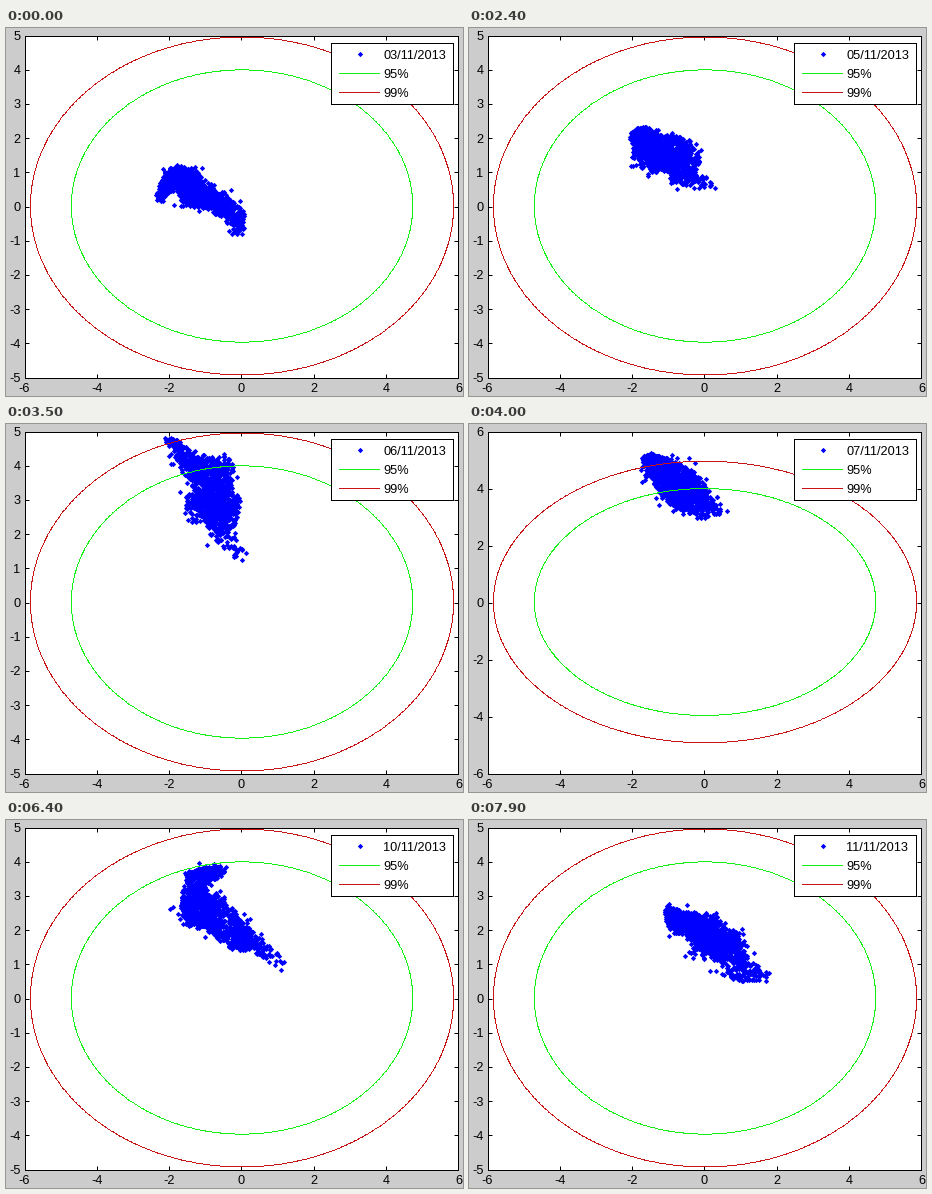
A matplotlib script for the animation above (8000 ms loop, 457 px wide and 368 px high).

```python
import numpy as np
import matplotlib.pyplot as plt
from matplotlib.animation import FuncAnimation
from matplotlib.patches import Rectangle

W, H, DPI = 457, 368, 64
PX = 72 / DPI  # points per pixel
BLUE, GREEN, RED = "#0000ff", "#14f014", "#c81414"
FRAMES, STEP = 80, 100

plt.rcParams.update({
    "font.family": "Liberation Sans",
    "font.size": 12.8 * PX,
    "axes.unicode_minus": False,
    "lines.antialiased": False,
    "patch.antialiased": False,
})


def scatter(seed, width, path, n=1200):
    """Scatter n points around a path, wide in the middle, thin at its ends."""
    rng = np.random.default_rng(seed)
    s = rng.beta(1.4, 1.8, n)
    x, y = np.transpose(path)
    knots = np.linspace(0, 1, len(path))
    r = width * (0.25 + 0.75 * np.sin(np.pi * s)) * rng.random(n) ** 0.5
    r *= np.where(rng.random(n) < 0.07, 1.6, 1)  # a few strays
    a = rng.uniform(0, 2 * np.pi, n)
    return np.interp(s, knots, x) + r * np.cos(a), np.interp(s, knots, y) + r * np.sin(a)


# First frame, day of November, y limit, cloud width, key points of the cloud
days = [
    (0, 3, 5, .42, [(-2.3, .2), (-1.9, .9), (-1.5, .8), (-1.4, .4), (-.9, .3),
                    (-.2, -.2), (0, -.9)]),
    (1, 4, 5, .52, [(-1.3, .05), (-2.1, .8), (-1.9, 1.3), (-1.1, .8),
                    (-.2, 1.2), (.6, 1.1), (0, 2), (-1.4, 2.2)]),
    (14, 5, 5, .56, [(-2, 2.1), (-1.6, 2), (-1.5, 1.5), (-1.1, 1.6),
                     (-.6, 1.5), (-.7, .9), (.3, .6)]),
    (25, 6, 5, .56, [(-2, 4.8), (-1.3, 3.9), (-.6, 3.8), (-1.1, 2.7),
                     (-.5, 3), (-.6, 2.1), (.1, 1.2)]),
    (38, 7, 6, .62, [(-1.6, 5.1), (-1.1, 4.6), (-.6, 4), (-.4, 3.6),
                     (.5, 3.2)]),
    (48, 8, 6, .72, [(-1.7, 5.7), (-1, 5), (-.3, 4.5), (-1.2, 4.2),
                     (0, 4), (.2, 3.3), (-1, 3)]),
    (64, 10, 5, .5, [(-.5, 3.8), (-1.3, 3.5), (-1.3, 2.5), (-.8, 2.6),
                     (-.3, 1.9), (.2, 1.7), (1.2, .9)]),
    (73, 11, 5, .52, [(-1, 2.6), (-.7, 2.2), (0, 2.1), (.1, 1.6), (.7, 1.6),
                      (.9, .8), (1.9, .7)]),
]
clouds = [scatter(day, width, path) for _, day, _, width, path in days]

fig = plt.figure(figsize=(W / DPI, H / DPI), dpi=DPI, facecolor="#cccccc")

# Plot area
ax = fig.add_axes([18.5 / W, 18.5 / H, 434 / W, 342 / H])
ax.set_xlim(-6, 6)
ax.set_xticks(range(-6, 7, 2))
for spine in ax.spines.values():
    spine.set_linewidth(PX)
ax.tick_params(direction="in", top=True, right=True, length=4 * PX, width=PX)
ax.tick_params(axis="y", pad=4 * PX)
ax.tick_params(axis="x", pad=6 * PX)

dot = dict(ls="", marker="D", ms=3.8 * PX, mew=0, color=BLUE)
cloud, = ax.plot([], [], **dot)

# Ellipses as chains of single pixels, for a crisp hairline
for a, b, color in ((4.72, 3.98, GREEN), (5.85, 4.94, RED)):
    turn = np.linspace(0, 2 * np.pi, int(240 * a))
    ax.plot(a * np.cos(turn), b * np.sin(turn), ls="", marker=",", color=color)

# Legend, in pixels from the top left
key = fig.add_axes([0, 0, 1, 1])
key.set(xlim=(0, W), ylim=(H, 0))
key.axis("off")
key.add_patch(Rectangle((324.5, 14.5), 122, 61, fc="white", ec="black", lw=PX))
key.plot([353.5], [26], **dot)


def label(y, text):
    return key.text(377, y + 4.7, text, va="baseline")


date_text = label(26, "")
for y, text, color in ((45, "95%", GREEN), (64, "99%", RED)):
    key.plot([333, 373], [y, y], color=color, lw=PX)
    label(y, text)


def draw(i):
    k = sum(day[0] <= i for day in days) - 1
    _, day, top, *_ = days[k]
    cloud.set_data(*clouds[k])
    date_text.set_text(f"{day:02d}/11/2013")
    ax.set_ylim(-top, top)
    ax.set_yticks(range(-top, top + 1, 1 if top == 5 else 2))
    return cloud, date_text


anim = FuncAnimation(fig, draw, frames=FRAMES, interval=STEP,
                     repeat=True, repeat_delay=0, blit=False)
plt.show()
```
